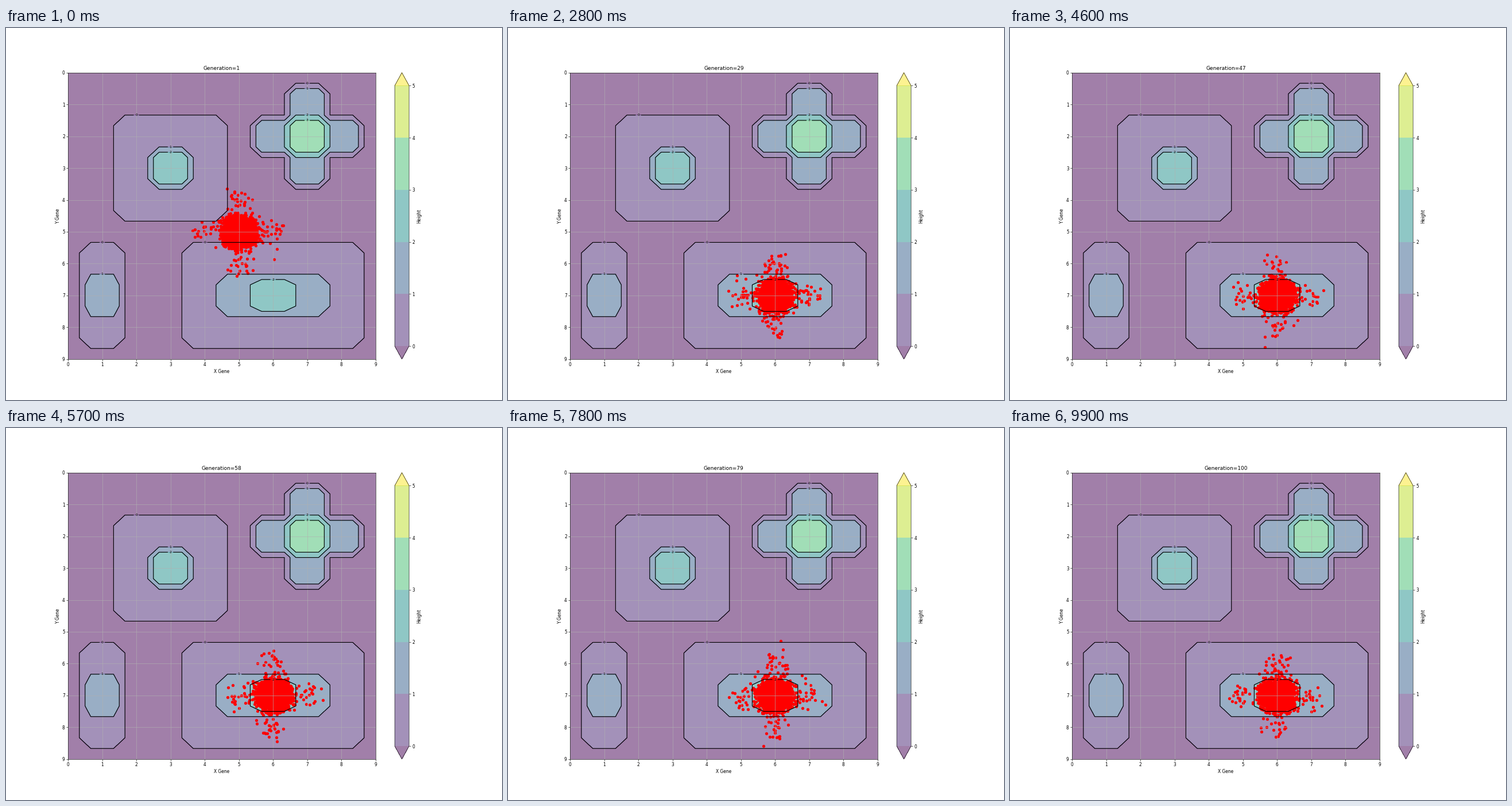
Animation, 864 px wide and 648 px high, one loop 10000 ms. Source, as a matplotlib script:

```python
import numpy as np
import matplotlib.pyplot as plt
from matplotlib.animation import FuncAnimation

SIZE = 10
POPULATION = 5000
GENERATIONS = 100
MUTATION = 0.01
JITTER = 0.2
PATH = [(5, 5), (5, 6), (5, 7), (6, 7)]  # best cell of the first generations


def landscape():
    """Height of every integer gene pair, indexed [y, x]."""
    h = np.zeros((SIZE, SIZE))
    h[2:5, 2:5] = 1
    h[3, 3] = 3
    h[1:4, 7] = 2
    h[2, 6:9] = 2
    h[2, 7] = 4
    h[6:9, 1] = 1
    h[7, 1] = 2
    h[6:9, 4:9] = 1
    h[7, 5:8] = 2, 3, 2
    return h


def population(gen):
    """Offspring of the best cell: rare unit mutations, jittered for display."""
    rng = np.random.default_rng(gen)
    genes = np.tile(PATH[min(gen, len(PATH)) - 1], (POPULATION, 1)).astype(float)
    mutated = rng.random(genes.shape) < MUTATION
    genes += mutated * rng.choice([-1, 1], genes.shape)
    return genes + rng.normal(0, JITTER, genes.shape)


fig, ax = plt.subplots(figsize=(16, 12), dpi=54)

axis = np.linspace(0, SIZE - 1, 3 * SIZE - 2)
cell = np.rint(axis).astype(int)
heights = landscape()[np.ix_(cell, cell)]
levels = np.arange(6)

fill = ax.contourf(axis, axis, heights, levels, cmap="viridis", alpha=0.5,
                   extend="both")
fig.colorbar(fill, ax=ax, label="Height")
ax.set(xlim=(0, 9), ylim=(9, 0), xticks=range(SIZE), yticks=range(SIZE),
       xlabel="X Gene", ylabel="Y Gene")
lines = ax.contour(axis, axis, heights, levels[:4], colors="black")
ax.clabel(lines, inline=True, inline_spacing=2.7, fontsize=8)
ax.grid(True)

dots = ax.scatter([], [], color="red")
title = ax.set_title("")


def update(i):
    dots.set_offsets(population(i + 1))
    title.set_text(f"Generation={i + 1}")
    return dots, title


anim = FuncAnimation(fig, update, frames=GENERATIONS, interval=100,
                     repeat=True, repeat_delay=0)
plt.show()
```
